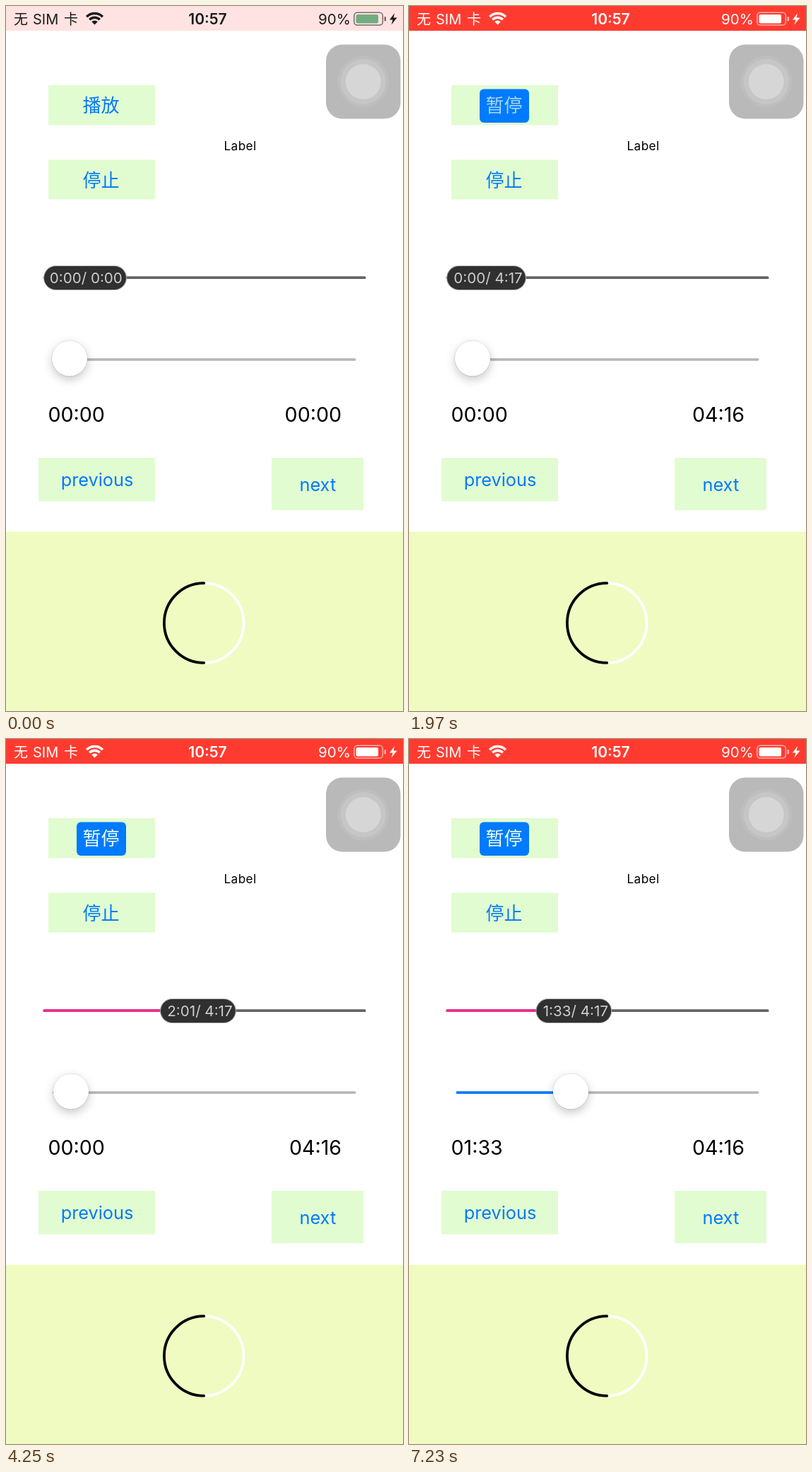
An HTML page with a canvas that plays this animation: 562 px wide and 997 px high, repeating every 8000 ms.

```html
<!DOCTYPE html>
<html lang="zh">
<meta charset="utf-8">
<style>
  html, body { margin: 0; overflow: hidden; background: #fff; }
  canvas { display: block; }
</style>
<canvas id="stage" width="562" height="997"></canvas>
<script>
const g = document.getElementById('stage').getContext('2d');
const LOOP = 8000, TOTAL = 257;
const BLUE = '#007aff', MINT = '#e1fcd0';
const LATIN = 'Inter, "Noto Sans CJK SC", "Noto Sans CJK", sans-serif';
const HAN = '"Noto Sans CJK SC", "Noto Sans CJK", sans-serif';

const clamp = x => Math.max(0, Math.min(1, x));
const ramp = (t, from, to) => clamp((t - from) / (to - from));
const ease = u => (1 - Math.cos(Math.PI * u)) / 2;
const mix = (a, b, u) => a + (b - a) * u;
const clock = s => Math.floor(s / 60) + ':' + String(Math.floor(s) % 60).padStart(2, '0');

function text(str, x, y, size, color, { align = 'left', family = LATIN, weight = 400, alpha = 1 } = {}) {
  g.globalAlpha = alpha;
  g.font = `${weight} ${size}px ${family}`;
  g.textAlign = align;
  g.fillStyle = color;
  g.fillText(str, x, y);
  g.globalAlpha = 1;
}

function box(x, y, w, h, color, r = 0) {
  g.fillStyle = color;
  g.beginPath();
  g.roundRect(x, y, w, h, r);
  g.fill();
}

function disc(x, y, r, color) {
  g.fillStyle = color;
  g.beginPath();
  g.arc(x, y, r, 0, 7);
  g.fill();
}

function arc(x, y, r, from, to, width, color) {
  g.strokeStyle = color;
  g.lineWidth = width;
  g.beginPath();
  g.arc(x, y, r, from, to);
  g.stroke();
}

function statusBar(t) {
  const p = ease(ramp(t, -183, 569));
  const grey = Math.round(255 * p ** 1.15);
  const ink = `rgb(${grey},${grey},${grey})`;
  box(0, 0, 562, 35, `rgb(255,${mix(255, 59, p)},${mix(255, 48, p)})`);

  text('无', 11, 25.5, 20, ink, { family: HAN });
  text('SIM', 38, 25.5, 20, ink);
  text('卡', 82, 25.5, 20, ink, { family: HAN });
  text('10:57', 285.5, 25.5, 21, ink, { align: 'center', weight: 600 });
  text('90%', 442, 25.5, 20.5, ink);

  g.lineCap = 'butt';
  for (const [r, w] of [[16, 3.6], [10.3, 3.4], [3, 6]])
    arc(125.5, 26.5, r, -Math.PI * .75, -Math.PI * .25, w, ink);

  g.strokeStyle = ink;
  g.globalAlpha = .6;
  g.lineWidth = 1.5;
  g.beginPath();
  g.roundRect(492.8, 9.3, 40.5, 17.8, 4.5);
  g.stroke();
  box(535.5, 15, 2.5, 6.5, ink, 1.2);
  g.globalAlpha = 1;
  box(495.5, 12, 31.5, 12.5, `rgb(${mix(90, 255, p)},${mix(160, 255, p)},${mix(105, 255, p)})`, 2);

  g.fillStyle = ink;
  g.fill(new Path2D('M550 10 L543 19.5 H547.5 L545.5 26.5 L553.5 16.5 H548.5 Z'));
}

function assistiveButton() {
  box(453, 54.5, 105.5, 105, '#b9b9b9', 23);
  disc(505.8, 107, 36.5, '#bebebe');
  disc(505.8, 107, 32, '#c6c6c6');
  disc(505.8, 107, 25, '#d6d6d6');
}

function buttons(t, playing) {
  box(60, 112, 151, 56.5, MINT);
  box(60, 217.5, 151, 56, MINT);
  box(46, 639, 165, 61.5, MINT);
  box(376, 639, 130, 74, MINT);

  const center = { align: 'center', family: HAN };
  if (playing) {
    const alpha = mix(.2, 1, ease(ramp(t, 1700, 2160)));
    box(100, 117.5, 70, 47.5, BLUE, 6);
    text('暂停', 134.5, 150, 26, '#f0fee8', { ...center, alpha });
  } else {
    const alpha = mix(1, .2, ease(ramp(t, 1170, 1500)));
    text('播放', 134.5, 150, 26, BLUE, { ...center, alpha });
  }
  text('停止', 134.5, 255.5, 26, BLUE, center);
  text('previous', 129, 679, 25.3, BLUE, { align: 'center' });
  text('next', 441.3, 685.5, 25.3, BLUE, { align: 'center' });
  g.letterSpacing = '0.4px';
  text('Label', 308.5, 203.5, 17.2, '#000');
  g.letterSpacing = '0px';
}

// Seconds shown on the dragged slider
function dragTime(t) {
  if (t < 3060) return 0;
  if (t < 3710) return 1;
  if (t < 4830) return mix(mix(17, 139, ease(ramp(t, 3700, 4430))), 141, ramp(t, 4500, 4690));
  if (t < 6210) return mix(140.5, 91.8, ease(ramp(t, 4830, 5530)));
  return t < 7230 ? 92.3 : 93.3;
}

function bubbleSlider(seconds, playing) {
  const label = clock(seconds) + '/ ' + (playing ? clock(TOTAL) : '0:00');
  g.font = `400 20.6px ${LATIN}`;
  const width = Math.min(118, g.measureText(label).width + 15.5);
  const left = 53 + (456 - width) * seconds / TOTAL;
  box(52.5, 382.3, 457, 3.7, '#646464', 2);
  if (seconds > 0) box(52.5, 382.3, left - 48, 3.7, '#ee2d8c', 2);
  box(left, 367, width, 35, '#a9b0a9', 17.5);
  box(left + 1, 368, width - 2, 33, '#303030', 16.5);
  text(label, left + (playing ? 10.3 : 8.8), 392.3, 20.6, '#cfcfcf');
}

function plainSlider(t) {
  const seconds = t < 3060 ? 0 : t < 6210 ? 1.3 : t < 7230 ? 92.3 : 93.3;
  const x = 90 + 383 * seconds / TOTAL;
  box(66.5, 498.2, 429, 3.6, '#b5b5b5', 1.8);
  box(66.5, 498.2, x - 66.5, 3.6, BLUE, 1.8);
  g.save();
  g.shadowColor = 'rgba(0,0,0,.22)';
  g.shadowBlur = 14;
  g.shadowOffsetY = 5;
  disc(x, 498.3, 25, '#fff');
  g.restore();
  arc(x, 498.5, 25.2, 0, 7, .8, 'rgba(0,0,0,.16)');
  disc(x, 498.3, 24.9, '#fff');
}

function ring() {
  box(0, 743.5, 562, 254, '#effbc1');
  g.lineCap = 'round';
  arc(280.2, 872.5, 56.3, -Math.PI / 2, Math.PI / 2, 3.8, '#fff');
  arc(280.2, 872.5, 56.3, Math.PI / 2, Math.PI * 1.5, 3.8, '#000');
}

function draw(t) {
  const playing = t >= 1700;
  box(0, 0, 562, 997, '#fff');
  statusBar(t);
  assistiveButton();
  buttons(t, playing);
  bubbleSlider(dragTime(t), playing);
  plainSlider(t);
  const elapsed = t < 4530 ? '00:00' : t < 6210 ? '00:01' : t < 7230 ? '01:32' : '01:33';
  text(elapsed, 59.5, 588, 28.6, '#000');
  text(playing ? '04:16' : '00:00', 475, 588, 28.6, '#000', { align: 'right' });
  ring();
}

const start = performance.now();
function tick() {
  draw((performance.now() - start) % LOOP);
  requestAnimationFrame(tick);
}
tick();
</script>
</html>
```
